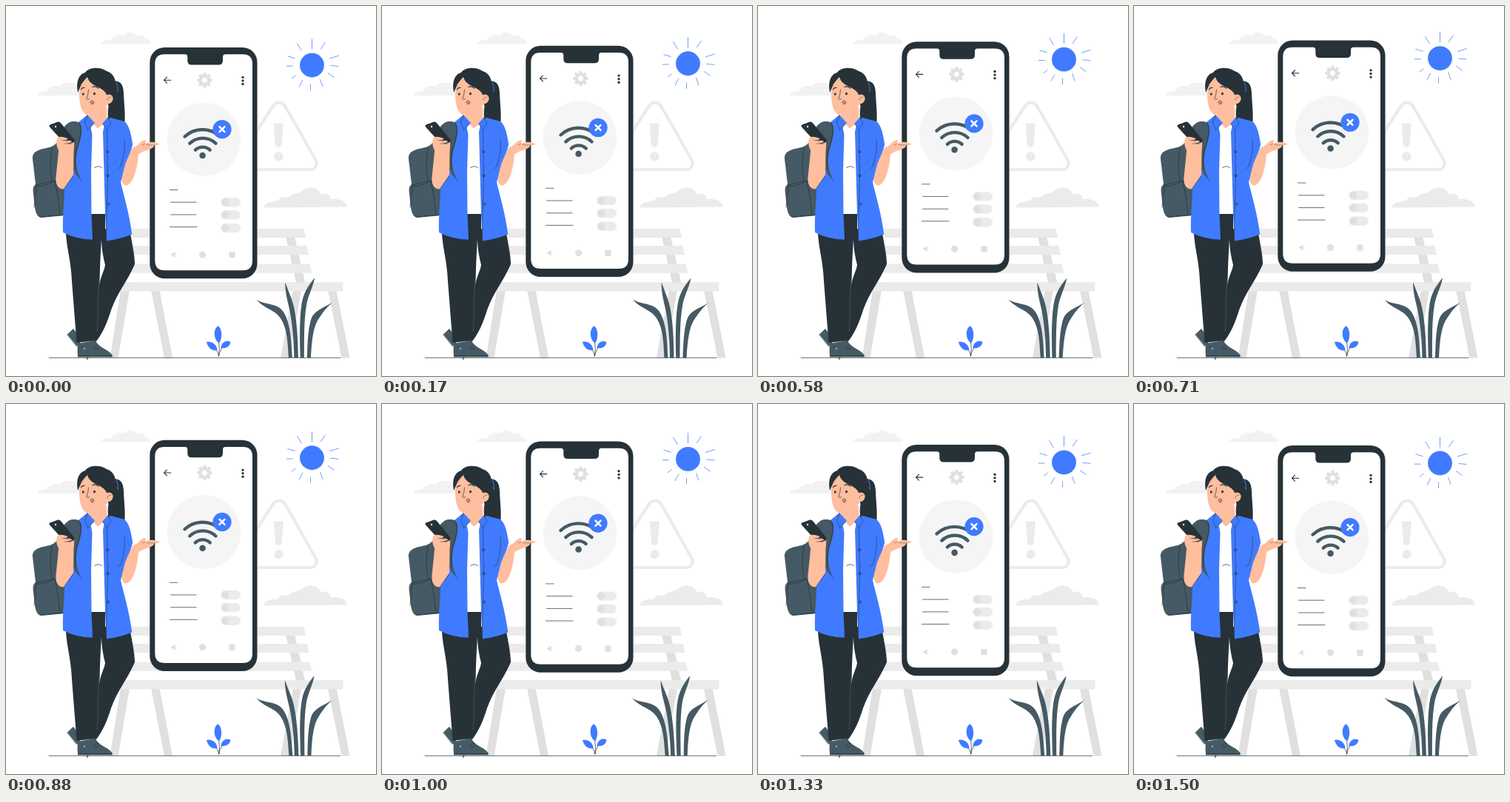
These frames come from a looping animation (500x500 px, 1540 ms). An HTML page:

```html
<!DOCTYPE html>
<html lang="en">
<head>
<meta charset="utf-8">
<title>No connection</title>
<style>
  html, body { margin: 0; width: 100%; height: 100%; overflow: hidden; background: #fff; }
  svg { display: block; width: 100%; height: 100%; }
  .sway { transform-box: fill-box; transform-origin: center; }
  .dark { fill: #263238; }
  .slate { fill: #455a64; }
  .blue { fill: #407bff; }
  .skin { fill: #ffbe9d; }
  .pale { fill: #f5f5f5; }
  .light { fill: #ebebeb; }
  .grey { fill: #e0e0e0; }
  .ink { fill: none; stroke: #263238; stroke-width: .7; stroke-linecap: round; stroke-linejoin: round; }
</style>
</head>
<body>
<svg viewBox="0 0 500 500">
  <defs>
    <g id="toggle">
      <rect class="light" x="290.5" y="-6.2" width="26.5" height="12.4" rx="6.2"/>
      <circle class="grey" cx="296.2" r="5.2"/>
    </g>
    <path id="tooth" class="grey" d="M-2.3 -7 L-1.8 -10.2 H1.8 L2.3 -7Z"/>
  </defs>

  <!-- clouds -->
  <g fill="#f2f2f2">
    <path d="M128 51.500C130 47 137 46 142 46C146 39 154 37 159 40C164 34 174 35 177 40C182 38 186 40 187 44C192 44 195 47 195.500 51Z"/>
    <path d="M42 121C43 116 49 115 55 115C60 108 67 106 72 109C78 103 88 102 94 106L112 110V121Z"/>
  </g>
  <path class="light" d="M349 272.500C349 266 357 264 366 264C370 259 375 257 381 259C388 252 396 254 401 249C410 243 422 245 425 254C432 252 438 255 439 261C450 260 460 264 461 271.500Z"/>

  <!-- warning sign -->
  <path d="M361 135C365 129 373 129 377 135L418 207C422 214 418 221 411 221H320C312 221 310 214 314 207Z" fill="none" stroke="#ebebeb" stroke-width="4.200"/>
  <path class="light" d="M363.500 158.500H373Q375 158.500 374.700 161L372.500 188Q372 191 368.300 191Q364.500 191 364 188L361.800 161Q361.500 158.500 363.500 158.500Z"/>
  <circle class="light" cx="368.300" cy="203.300" r="6.200"/>

  <!-- bench -->
  <g class="grey">
    <path d="M377 307H389L405 378H393Z"/>
    <path d="M155 384H167L151.500 475.500H140.500Z"/>
    <path d="M196 384H207.500L225 475.500H214Z"/>
    <path d="M388 384H399L383 475.500H371Z"/>
    <path d="M435 384H446.500L464.500 475.500H453.500Z"/>
  </g>
  <g class="light">
    <path d="M150 300.800H402L405.500 313H150Z"/>
    <path d="M150 324H406.500L409.500 336.300H150Z"/>
    <path d="M150 348.400H410.500L413.500 360.700H150Z"/>
    <path d="M145 373.300H455.500V385.500H145Z"/>
  </g>
  <path class="ink" stroke-width=".6" d="M58 475.400H452"/>

  <!-- sun -->
  <g class="float">
    <circle class="blue" cx="413.500" cy="80" r="16.400"/>
    <path fill="none" stroke="#407bff" stroke-width=".75" d="M413.500 44.500V58.500M431.500 49L425 58.500M450 67L437 71M449.500 81.500L438.500 80.500M443.500 96.500L435 90.500M428 109L424.500 99M411.500 114V105.500M396 109.500L401 100M386 98.500L391.500 94M379 81.200H387.500M380.500 67.700L390.500 70.700M393.500 50.500L399.500 60.500"/>
  </g>

  <!-- phone -->
  <g class="float">
    <rect class="dark" x="194.300" y="56" width="145.200" height="312.300" rx="20"/>
    <path fill="#fff" d="M214 65.300H242Q245.300 65.300 245.300 69V74Q245.300 79.500 251 79.500H287Q293 79.500 293 74V69Q293 65.300 296.500 65.300H320Q333 65.300 333 78V344Q333 357.300 320 357.300H214.500Q201.300 357.300 201.300 344V78Q201.300 65.300 214 65.300Z"/>
    <path class="ink" stroke-width="1.100" d="M222.700 100.200H213.500M217.500 96.200L213.500 100.200L217.500 104.200" style="stroke-width:1.100"/>
    <g id="gear" transform="translate(268.400 100.200)">
      <circle r="5.700" fill="none" stroke="#e0e0e0" stroke-width="4.200"/>
    </g>
    <g class="dark"><circle cx="320" cy="96.300" r="1.650"/><circle cx="320" cy="100.900" r="1.650"/><circle cx="320" cy="105.500" r="1.650"/></g>
    <circle cx="267.500" cy="180.200" r="49.800" class="pale"/>
    <g fill="none" stroke="#455a64" stroke-width="4.400" stroke-linecap="round">
      <path d="M241.500 176.500A35 35 0 0 1 289.500 176.500"/>
      <path d="M248.300 185.700A25.500 25.500 0 0 1 283.500 185.700"/>
      <path d="M255.800 194.600A14.500 14.500 0 0 1 275.700 194.600"/>
    </g>
    <circle class="slate" cx="265.600" cy="202" r="4.300"/>
    <circle class="blue" cx="292" cy="166.700" r="12.600"/>
    <path d="M288.500 163.200L295.500 170.200M295.500 163.200L288.500 170.200" stroke="#fff" stroke-width="2.500" stroke-linecap="round"/>
    <path class="ink" d="M221.500 248.500H232M222.500 265.200H257M222.500 282H257M221.500 298.600H258"/>
    <use href="#toggle" y="265.200"/>
    <use href="#toggle" y="282.300"/>
    <use href="#toggle" y="300"/>
    <g class="grey">
      <path d="M222 336L228.800 332V340Z"/>
      <circle cx="265.500" cy="336" r="4.600"/>
      <rect x="301.300" y="332" width="8.300" height="8.200" rx="1.200"/>
    </g>
  </g>

  <!-- plants -->
  <g class="sway slate">
    <path d="M338.200 396.800C349 404 364 401 373 411C384 424 385.500 450 387 475.500H382C380.500 452 380 436 371 422C363 410 350 410 338.200 396.800Z"/>
    <path d="M377.200 373C382 387 387 396 389.500 409C393.500 430 394.500 452 395 475.500H389.500C389 450 387 430 383.500 412C380.500 398 377 388 377.200 373Z"/>
    <path d="M417 367.300C415 380 408.500 390 406 404C402.500 425 403 450 403 475.500H397.800C397 450 396.500 426 399 406C401.500 388 407 380 417 367.300Z"/>
    <path d="M441.200 400.500C432 408 426 417 420 427C414 440 413 458 412 475.500H407C407.500 456 408 438 412 424C415.500 412 427 409 441.200 400.500Z"/>
  </g>
  <g class="sway">
    <path class="ink" d="M287.500 453Q289.300 464 287.600 473M282 463Q286.500 466 287.600 473M292 462Q288.500 466 287.600 473"/>
    <path class="blue" d="M286.200 432.500C291 434 293.500 447 288.200 455.500C280.500 452 279.500 437 286.200 432.500Z"/>
    <path class="blue" d="M271 454C278 452.500 285 457 285.500 465C278 467 272.500 461 271 454Z"/>
    <path class="blue" d="M303.300 454C303 460 297 463.500 290.300 462C291 455 297.500 450.500 303.300 454Z"/>
  </g>

  <!-- ponytail and backpack -->
  <path class="dark" d="M145 101C155 101 158.500 106 159 118C159.500 132 161.500 146 160.300 159L138 154L143 128Z"/>
  <path d="M149 102Q152 107 151 116" fill="none" stroke="#407bff" stroke-width=".9"/>
  <path class="slate" d="M36 207C35 197 43 194 59 191C65 189 68 186 71 181C76 162 84 155 94 156L103 160L100 240L80 283L48 286C43 286 40 280 39 272L36.500 250Q36 244 40 241Z"/>
  <path class="ink" d="M40 242L66 236M62 191Q58 213 62 236M40 243Q52 245 66 236Q71 258 73 283M38 272L41 244M47 285L78 282"/>

  <!-- shoes and trousers -->
  <path class="slate" d="M91 436L100 448V461L95 459L82.500 444Z"/>
  <path d="M82.500 444L95.500 460.500" stroke="#a6b0b5" stroke-width="1.200"/>
  <path class="slate" d="M97 456L121 452C125 462 141 465 144 472.500Q144 474.500 142 474.500H97Q96 464 97 456Z"/>
  <path d="M97 472.700H143.500" stroke="#263238" stroke-width=".7"/>
  <path class="ink" d="M118 461L123 459M120 464.500L126 462M109 474.500L110 478L111 474.500"/>
  <circle cx="106" cy="463" r="1.200" fill="#a6b0b5"/>
  <path class="dark" d="M130 300L168 308C171 323 174 338 174 349C163 374 151 386 142 411C137 427 131 442 122 453L113 450L126.500 375C129 363 133 357 134 350C131 338 129 327 129 315Z"/>
  <path class="dark" d="M115 279H134V315H129C127.500 337 127 354 126.500 373C124 400 124 426 123 452L95.500 455L89 372C88 345 82 328 81 307Z"/>
  <path d="M126.500 365C123 390 126 414 123 440" fill="none" stroke="#526168" stroke-width=".6"/>

  <!-- tee and neck -->
  <path fill="#fff" d="M114 159L133 158L134 281H115Z"/>
  <path class="skin" d="M112 143L137 137C135 145 136 149 139 153L124 166L111 151Z"/>
  <path fill="#fff" d="M116 163L124 165.500L133 159V176H116Z"/>
  <path class="ink" d="M119.500 218.500Q125 215 129.500 218.500"/>

  <!-- forearms -->
  <path class="skin" d="M72 187C75 179 82 175 91 179L93 184C92 190 91 196 92 205V226C88 236 83 245 77 247.500C70 247 66.500 240 67.500 231Z"/>
  <path class="skin" d="M156 232L162 208L172 191L178 188C181 184 185 181 189 181C189.500 183 188 184.500 187.500 186C194 183 200 183 207.500 186.500C207.500 188.500 202 187.800 200 188.200C201 190.500 195 194 188 195.500L179 200C178 216 174 234 166 241C161 244.500 156 241 156 232Z"/>
  <path class="ink" stroke="#263238" d="M190 187.500L201 188M187.500 186L184 188" style="stroke-width:.4"/>

  <!-- shirt -->
  <path class="blue" d="M110 147L98 157C101 171 98 184 93 199L91 228L79 246C79 266 76 286 77 306Q94 315 117 315.800L115.500 281L115 224L116.500 174L113 155Z"/>
  <path class="blue" d="M138 150L160 156C167 161 169.500 176 171.200 187C169 199 162 208 160 218L155 238C159 256 166 277 170.300 308.500Q154 315 136 317.500L134 281L131 170L134 157Z"/>
  <path class="blue" d="M110 147L106 157L110.500 168L120 158ZM138 150L142 158L137 167.500L130 159Z"/>
  <path class="ink" d="M110 148L106.500 157.500L110.500 167.500L117.500 159M138 151L142 158L137 167L131.500 160M136.500 168L137.500 230L135 316M160 180Q162 195 155 217L151 220M91 220Q97 233 103 236M79 246L91 230" style="stroke-width:.55"/>
  <g class="ink"><circle cx="137" cy="197" r="1.700"/><circle cx="137.300" cy="229.200" r="1.700"/><circle cx="138" cy="267.700" r="1.700"/></g>

  <!-- strap, handset and fingers -->
  <path class="slate" d="M84 158C92 154 101 156 102 163C104 178 95 193 95 207C94.500 219 98 228 102 235L92 224C90 208 93 193 92 181Z"/>
  <path class="ink" d="M98 157Q104 165 99 182Q91 203 94 220"/>
  <path class="dark" d="M59.500 160.500L70 156.500Q72.500 156 74 158L92 180Q94 183 91 184.500L83 187Q80.500 187.500 79 185.500L59 163.500Q57.500 161.500 59.500 160.500Z"/>
  <circle cx="67" cy="163" r="1.200" fill="#fff"/>
  <path class="skin" d="M71 195C68 189 67 182 70 178C74 175 80 178 83 178.500C84 181 80 181 76 181C81 182 87 181 89 183C88 185.500 83 185 80 185C85 186 89 186 90 188C89 191 84 190 81 190C85 192 86 194 84 196Z"/>
  <path class="ink" d="M76 181.500L84 182.500M79 186L88 186.500" style="stroke-width:.4"/>

  <!-- head -->
  <path class="skin" d="M100 103C98.500 115 98.500 126 101 136C103 143 107 148 114 147.500C125 146 134 140 138 131L139 103L120 90Z"/>
  <path class="dark" d="M97 117C94 101 99 92 107 90C112 82 128 82 136 88C145 91 149 99 147.500 107C148 122 147 140 139.500 153C137 149 137.500 143 138.500 136L136 120C134 114 126 110 119 107C114 104 111 100 110 96C106 100 102 104 100.500 109Z"/>
  <path class="skin" d="M134.500 122C136 118.500 143.500 118.500 144.500 124C145 130 140 133 136 132Z"/>
  <path class="ink" d="M112 96Q128 101 138 113M137 127Q138 122 142 123" style="stroke-width:.5"/>
  <path class="ink" d="M101.500 112.500Q103 110 106 110.500M117 109.500Q121 107.500 125 111" style="stroke-width:1.200"/>
  <ellipse class="dark" cx="104.300" cy="119" rx="1.400" ry="1.700"/>
  <ellipse class="dark" cx="119.500" cy="118.500" rx="1.500" ry="1.700"/>
  <path class="ink" d="M111.500 113Q111.500 120 108.500 125.500Q110 127 112.500 126"/>
  <path d="M114 129.500Q116.500 126.500 119 130Q118 134 115.500 132.500Z" fill="#e58b78" stroke="#263238" stroke-width=".6"/>
</svg>
<script>
  const LOOP = 1540, FPS = 24, CYCLE = 36;
  const all = s => document.querySelectorAll(s);
  const floats = all('.float'), plants = all('.sway');
  const triangle = p => 1 - Math.abs(1 - 2 * p);

  const gear = document.getElementById('gear');
  for (let i = 0; i < 8; i++) {
    const tooth = document.createElementNS('http://www.w3.org/2000/svg', 'use');
    tooth.setAttribute('href', '#tooth');
    tooth.setAttribute('transform', `rotate(${i * 45})`);
    gear.append(tooth);
  }

  // Motion is stepped at 24 steps per second, rounded to 10 ms.
  function draw(t) {
    const step = Math.floor((t % LOOP + 5) * FPS / 1000);
    const p = (step + 1) % CYCLE / CYCLE;
    const y = 0.55 - 10 * triangle(p);
    const angle = 2 * triangle((p + 0.25) % 1) - 1;
    floats.forEach(g => g.setAttribute('transform', `translate(0 ${y})`));
    plants.forEach(g => g.style.transform = `rotate(${angle}deg)`);
  }

  const start = performance.now();
  function tick() {
    draw(performance.now() - start);
    requestAnimationFrame(tick);
  }
  tick();
</script>
</body>
</html>
```
